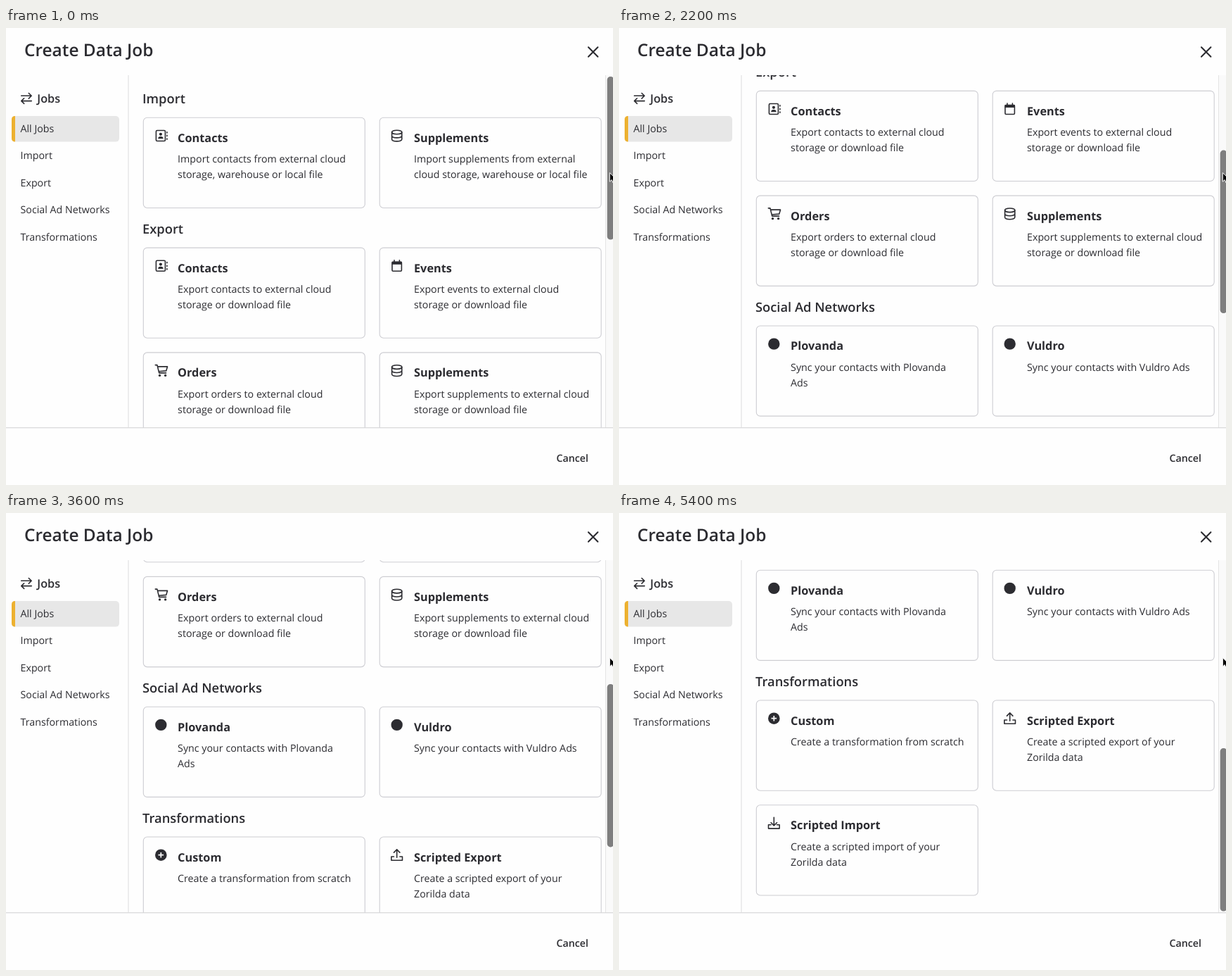
These frames come from a looping animation (863x649 px, 5.8 s). An HTML page:

```html
<!DOCTYPE html>
<html lang="en">
<head>
<meta charset="utf-8">
<title>Create Data Job</title>
<style>
  html, body { margin: 0; width: 100%; height: 100%; overflow: hidden; background: #fefefe; }
  svg { display: block; width: 863px; height: 649px; }
  text { font-family: "Open Sans", "Noto Sans", sans-serif; font-size: 14.26px; fill: #2c2c31; text-rendering: geometricPrecision; white-space: pre; }
  .title { font-size: 24.45px; font-weight: 600; }
  .section { font-size: 18.33px; font-weight: 600; }
  .name { font-size: 16.3px; font-weight: 700; }
  .jobs { font-size: 16.3px; font-weight: 600; }
  .button { font-weight: 600; }
  .card { fill: #fefefe; stroke: #cdcdd2; stroke-width: 1.1; }
  .line { fill: none; stroke: #2c2c31; stroke-width: 1.6; stroke-linecap: round; stroke-linejoin: round; }
  .solid { fill: #2c2c31; }
</style>
</head>
<body>
<svg viewBox="0 0 863 649">
  <defs>
    <clipPath id="view"><rect x="174" y="67" width="689" height="500.5"/></clipPath>
    <!-- Icons are centred on 0,0 -->
    <g id="contacts">
      <rect class="line" x="-6.9" y="-7.5" width="13" height="15" rx="1.5"/>
      <circle class="solid" cx="-.4" cy="-2.2" r="2.1"/>
      <path class="solid" d="M-4.1 4.2q0-3.2 3.7-3.2t3.7 3.2z"/>
      <path class="line" d="M8.6-5.2v1.2M8.6-.6v1.2M8.6 4v1.2"/>
    </g>
    <g id="stack" class="line">
      <ellipse cy="-5" rx="7.1" ry="2.8"/>
      <path d="M-7.1-5V5C-7.1 8.8 7.1 8.8 7.1 5V-5M-7.1 0C-7.1 3.8 7.1 3.8 7.1 0"/>
    </g>
    <g id="calendar">
      <rect class="line" x="-6.7" y="-5.6" width="13.4" height="13" rx="1.2"/>
      <path class="solid" d="M-7-6H7v4H-7z"/>
      <path class="line" d="M-3.7-8v2M3.7-8v2"/>
    </g>
    <g id="cart">
      <path class="line" d="M-8-8h2.6L-2.6 3.3H7.2M-4.9-5.7H9.2L7.4.3-3.3 1.2"/>
      <circle class="solid" cx="-1.8" cy="6.8" r="1.7"/>
      <circle class="solid" cx="6.3" cy="6.8" r="1.7"/>
    </g>
    <circle id="dot" class="solid" r="8.2"/>
    <g id="plus">
      <circle class="solid" r="8.3"/>
      <path d="M-3.8 0H3.8M0-3.8V3.8" stroke="#fefefe" stroke-width="1.7"/>
    </g>
    <path id="tray" class="line" d="M-4.2 2.3H-7.8V7.6H7.8V2.3H4.2"/>
    <g id="upload"><use href="#tray"/><path class="line" d="M0 3.6V-7.6M-4.2-3.6L0-7.8 4.2-3.6"/></g>
    <g id="download"><use href="#tray"/><path class="line" d="M0-8.2V3.2M-4.2-.8L0 3.4 4.2-.8"/></g>
  </defs>

  <rect width="863" height="649" fill="#fefefe"/>
  <text class="title" x="26" y="40.3">Create Data Job</text>
  <path d="M828 27.3l13.4 13.4m0-13.4L828 40.7" fill="none" stroke="#2c2c31" stroke-width="2.1" stroke-linecap="round"/>

  <path class="line" d="M21.7 96.3H36M32.3 92.5l3.9 3.8-3.9 3.8M36.3 103.6H22M25.7 99.8l-3.9 3.8 3.9 3.8"/>
  <text class="jobs" x="44.3" y="105.6">Jobs</text>
  <rect x="8" y="125" width="153" height="36.6" rx="5" fill="#e7e7e7"/>
  <path d="M13 125v36.6q-5 0-5-5V130q0-5 5-5z" fill="#edb130"/>
  <g id="menu"></g>
  <path d="M174 67V567" stroke="#dedee0" stroke-width="1.1"/>

  <g clip-path="url(#view)">
    <g id="content"></g>
    <rect x="852" y="67" width="11" height="501" fill="#fafafa"/>
    <path d="M852.5 67V568" stroke="#e4e4e4"/>
    <rect id="thumb" x="854.7" y="69" width="9.6" height="231.5" rx="4.6" fill="#7e7e7e"/>
  </g>
  <path d="M0 567.7H863" stroke="#cfcfd1" stroke-width="1.1"/>
  <text class="button" x="782.4" y="615.8">Cancel</text>
  <path d="M858.3 205.6v12.6l2.9-2.7 2 4.6 2.3-1-2-4.5h4z" fill="#000" stroke="#fff" stroke-width="1"/>
</svg>
<script>
const LOOP = 5800, STEP = 200, THUMB_RATIO = 265 / 564.5;

const label = (x, y, text, cls = "") => `<text class="${cls}" x="${x}" y="${y}">${text}</text>`;

const menu = ["All Jobs", "Import", "Export", "Social Ad Networks", "Transformations"];
document.getElementById("menu").innerHTML =
  menu.map((text, i) => label(20.5, 148 + i * 38.4, text)).join("");

const sections = [
  ["Import", [
    ["contacts", "Contacts", "Import contacts from external cloud", "storage, warehouse or local file"],
    ["stack", "Supplements", "Import supplements from external", "cloud storage, warehouse or local file"]]],
  ["Export", [
    ["contacts", "Contacts", "Export contacts to external cloud", "storage or download file"],
    ["calendar", "Events", "Export events to external cloud", "storage or download file"],
    ["cart", "Orders", "Export orders to external cloud", "storage or download file"],
    ["stack", "Supplements", "Export supplements to external cloud", "storage or download file"]]],
  ["Social Ad Networks", [
    ["dot", "Plovanda", "Sync your contacts with Plovanda", "Ads"],
    ["dot", "Vuldro", "Sync your contacts with Vuldro Ads", ""]]],
  ["Transformations", [
    ["plus", "Custom", "Create a transformation from scratch", ""],
    ["upload", "Scripted Export", "Create a scripted export of your", "Zorilda data"],
    ["download", "Scripted Import", "Create a scripted import of your", "Zorilda data"]]]
];

function card([icon, name, first, second], x, y) {
  return `<g transform="translate(${x} ${y})">
    <rect class="card" width="315" height="128.2" rx="5.5"/>
    <use href="#${icon}" x="${x < 500 ? 25 : 24.5}" y="25.7"/>
    ${label(48.8, 34.5, name, "name")}${label(48.8, 63.9, first)}${label(48.8, 85.9, second)}</g>`;
}

function buildContent() {
  let y = 127.3, html = "";
  for (const [heading, cards] of sections) {
    html += label(194, y - 20, heading, "section");
    cards.forEach((data, i) => {
      html += card(data, i % 2 ? 531.2 : 195.3, y + Math.floor(i / 2) * 148.8);
    });
    y += 184.8 + (Math.ceil(cards.length / 2) - 1) * 148.8;
  }
  return html;
}

const content = document.getElementById("content");
const thumb = document.getElementById("thumb");
content.innerHTML = buildContent();

// Time in ms, scroll in px, speed in px per step
const keys = [
  [600, 0, 0], [1200, 38.5, 30], [1800, 156.5, 36], [2600, 282, 29],
  [3600, 370.5, 0], [3800, 370.5, 0], [4400, 504.5, 45], [5000, 564.5, 0]
];

function scrollAt(time) {
  if (time <= keys[0][0]) return 0;
  const next = keys.findIndex(key => key[0] >= time);
  if (next < 0) return keys[keys.length - 1][1];
  const [t0, p0, v0] = keys[next - 1], [t1, p1, v1] = keys[next];
  const s = (time - t0) / (t1 - t0), span = (t1 - t0) / STEP;
  const blend = s * s * (3 - 2 * s);
  return p0 + (p1 - p0) * blend + span * s * (1 - s) * (v0 * (1 - s) - v1 * s);
}

function draw(time) {
  const scroll = scrollAt(Math.floor(time / STEP) * STEP);
  content.setAttribute("transform", `translate(0 ${-scroll})`);
  thumb.setAttribute("y", 69 + scroll * THUMB_RATIO);
}

const start = performance.now();
function tick() {
  draw((performance.now() - start) % LOOP);
  requestAnimationFrame(tick);
}
tick();
</script>
</body>
</html>
```
